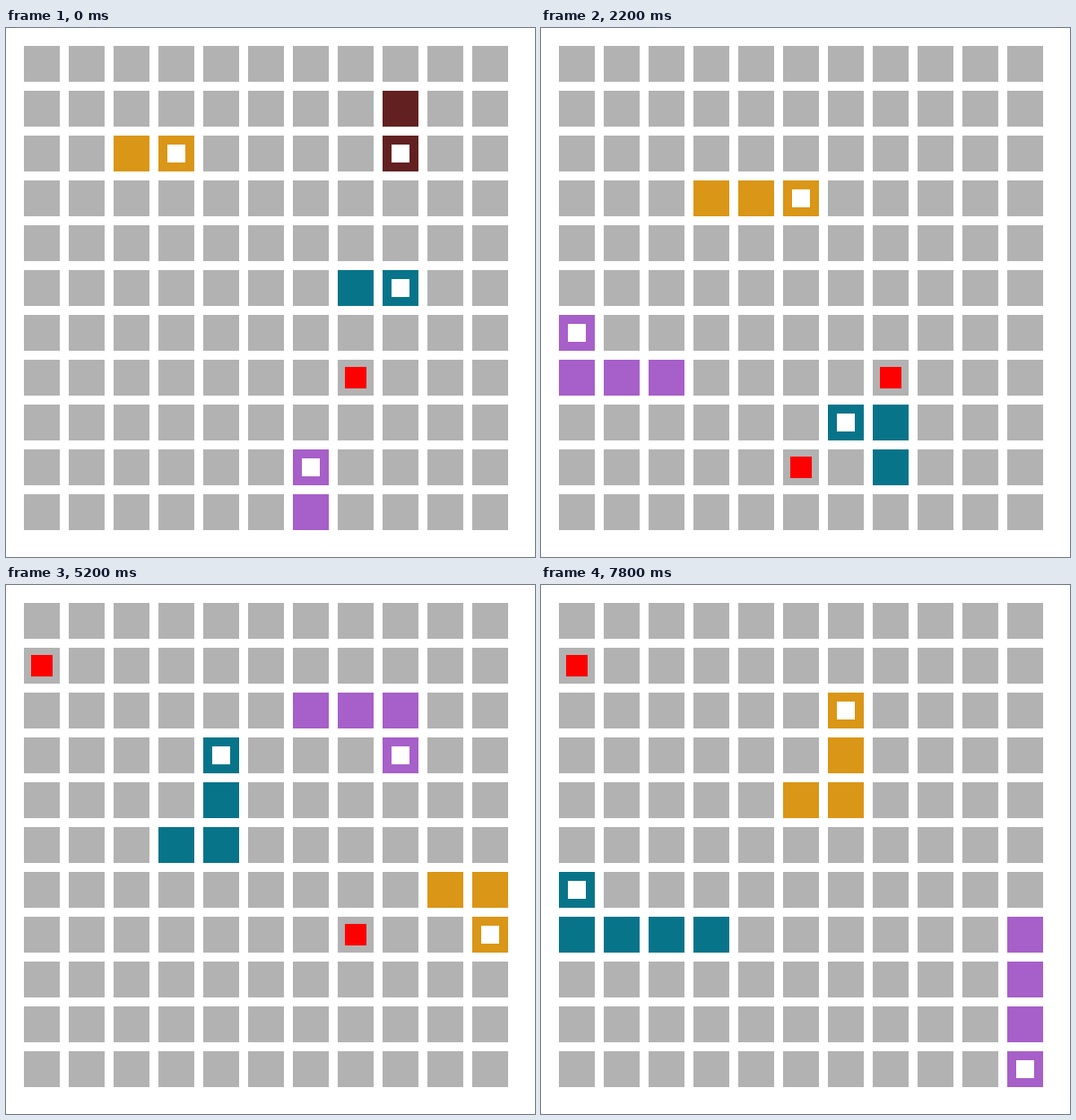
Write an HTML page with a canvas that moves like this. It is 590 px wide and 590 px high and loops after 8000 ms.

```html
<!DOCTYPE html>
<html lang="en">
<head>
<meta charset="utf-8">
<title>Snakes</title>
<style>
  html, body { margin: 0; width: 100%; height: 100%; overflow: hidden; background: #fff; }
  canvas { display: block; }
</style>
</head>
<body>
<canvas id="board" width="590" height="590"></canvas>
<script>
const ctx = document.getElementById('board').getContext('2d');
const TICK = 200, TICKS = 40, GRID = 11, PITCH = 50, MARGIN = 20, CELL = 40;
const STEP = { U: [0, -1], D: [0, 1], L: [-1, 0], R: [1, 0] };

// Each route starts one tick before the loop; meals are the ticks at which a snake grows.
const snakes = [
  { color: '#da9617', start: [2, 2], meals: [31],
    moves: 'RRRRDLLULDRRRRRRRDDLLLDRRRDDLLLULULUURUU' },
  { color: '#632021', start: [8, 1], meals: [],
    moves: 'DDRRDLLDRR' },
  { color: '#08748a', start: [7, 5], meals: [13, 31],
    moves: 'RRRDDDDLLLULLDLLLUULUURRRUUULLDDRDDDLLLU' },
  { color: '#a75fc9', start: [6, 10], meals: [9],
    moves: 'UUUULLLDLLLUUURRUURRRDRURRDDLLDRRRRDDDDD' }
];

const foods = [
  { cell: [7, 7], from: 0, to: 31 },
  { cell: [5, 9], from: 5, to: 13 },
  { cell: [1, 7], from: 7, to: 9 },
  { cell: [0, 1], from: 19, to: TICKS },
  { cell: [2, 4], from: 28, to: 31 }
];

for (const snake of snakes) {
  snake.path = [snake.start];
  for (const move of snake.moves) {
    const [x, y] = snake.path[snake.path.length - 1];
    const [dx, dy] = STEP[move];
    snake.path.push([x + dx, y + dy]);
  }
}

function square([col, row], size, color) {
  const inset = MARGIN + (CELL - size) / 2;
  ctx.fillStyle = color;
  ctx.fillRect(col * PITCH + inset, row * PITCH + inset, size, size);
}

function drawSnake({ path, meals, color }, tick) {
  const head = tick + 1;
  if (head >= path.length) return;
  const length = 3 + meals.filter(meal => meal <= tick).length;
  for (const cell of path.slice(Math.max(0, head + 1 - length), head + 1)) {
    square(cell, CELL, color);
  }
  square(path[head], 20, '#fff');
}

function draw(tick) {
  ctx.fillStyle = '#fff';
  ctx.fillRect(0, 0, 590, 590);
  for (let i = 0; i < GRID * GRID; i++) {
    square([i % GRID, Math.floor(i / GRID)], CELL, '#b2b2b2');
  }
  for (const { cell, from, to } of foods) {
    if (tick >= from && tick < to) square(cell, 24, '#f00');
  }
  for (const snake of snakes) drawSnake(snake, tick);
}

const origin = performance.now();
function frame() {
  const elapsed = Math.max(0, performance.now() - origin);
  draw(Math.floor(elapsed / TICK) % TICKS);
  requestAnimationFrame(frame);
}
frame();
</script>
</body>
</html>
```
